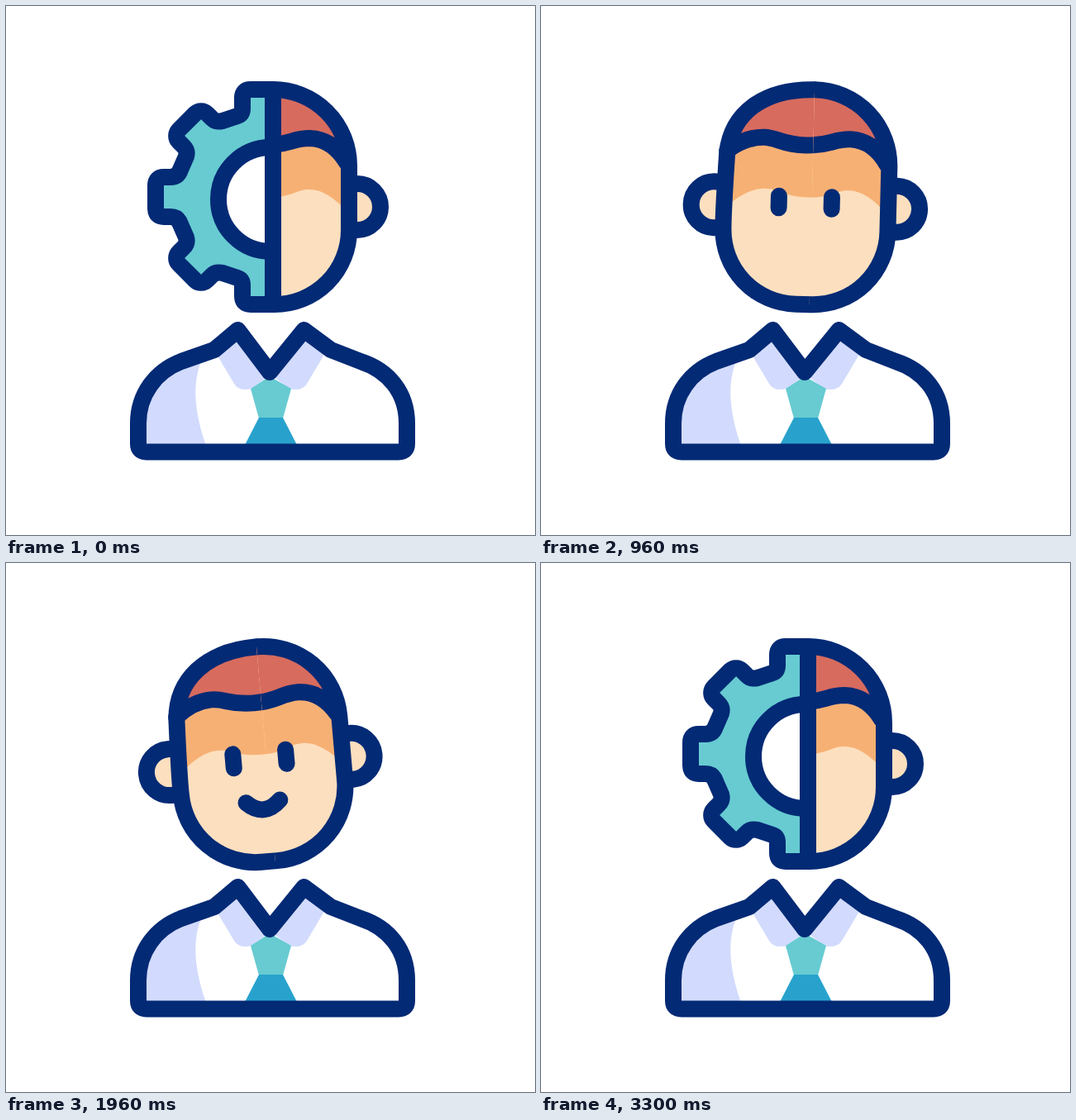
Recreate the animation shown at these times as an HTML page. Size 640 px wide and 640 px high, loop 3560 ms.

```html
<!DOCTYPE html>
<html lang="en">
<head>
<meta charset="utf-8">
<title>Half gear, half head</title>
<style>
  html, body { margin: 0; height: 100%; overflow: hidden; background: #fff; }
  svg { display: block; width: 100vw; height: 100vh; }
  .line { fill: none; stroke: #032a75; stroke-width: 20; stroke-linecap: round; stroke-linejoin: round; }
  .teal { fill: #67cbd1; }
  .skin { fill: #fcdfbe; }
  .cloth { fill: #d2dbfd; }
</style>
</head>
<body>
<svg viewBox="0 0 640 640">
  <defs>
    <clipPath id="gearSide"><path d="M0 0H323V640H0Z"/></clipPath>
    <clipPath id="leftSide"><path d="M0 0H326V640H0Z"/></clipPath>
    <clipPath id="rightSide"><path d="M325 0H640V640H325Z"/></clipPath>
    <path id="skull" d="M325.5 101A92 92 0 0 1 417.5 193V271A90 90 0 0 1 327.5 361H308.5A90 90 0 0 1 218.5 271Q218 250 221 180C225 133 262 101 325.5 101Z"/>
    <clipPath id="inHead"><use href="#skull"/></clipPath>
    <g id="head">
      <use href="#skull" class="skin"/>
      <g clip-path="url(#inHead)">
        <path fill="#f7b074" d="M218 100V248Q245 222 267 222C286 222 290 231.5 320 231.5S352 222 370 222Q392 222 418 252V100Z"/>
        <path fill="#d76b5e" d="M218 90V179Q243 160 265 160C282 160 286 168.5 316 168.5S348 160 370 160Q398 161 414 190V90Z"/>
      </g>
      <path class="line" d="M221 177Q243 160 265 160C282 160 286 168.5 316 168.5S348 160 370 160Q398 161 415 190"/>
      <use href="#skull" class="line"/>
    </g>
    <g id="ear">
      <circle r="28" class="skin"/>
      <circle r="28" class="line"/>
    </g>
    <path id="rim" d="M323 101H296Q286 101 286 111V124Q286 131 280 133L262 139Q254 141 249 136L243 130A10 10 0 0 0 229 130L209 150A10 10 0 0 0 209 164L215 170Q220 175 218 182L211 198Q208 207 199 207H191Q181 207 181 217V231"/>
    <g id="halfGear">
      <path class="teal" d="M323 101H296L286 111V130L255 140L236 127L206 157L219 177L208 207H181V231H323Z"/>
      <use href="#rim" class="teal"/>
      <use href="#rim" class="line"/>
    </g>
  </defs>

  <g id="body">
    <path class="cloth" d="M160 529V500Q165 450 236 430Q220 470 242 532H160Z"/>
    <path class="cloth" d="M254 420L276 457Q281 465 292 464Q298 463 301 460L320 446L339 460Q342 463 348 464Q359 465 364 457L386 420L360 400L319 446L280 400Z"/>
    <path class="teal" d="M319 448L345 463L335 499H306L296 463Z"/>
    <path fill="#28a2cd" d="M306 498H335L352 531H289Z"/>
    <path class="line" d="M319 443L280.5 392L252 416L212 430C181 442 160 470 160 505V529.5Q160 539.5 170 539.5H475Q485 539.5 485 529.5V505C485 468 463 441 429 430L393 416L360.5 392Z"/>
  </g>

  <g clip-path="url(#gearSide)">
    <g id="gear">
      <use href="#halfGear"/>
      <use href="#halfGear" transform="matrix(1 0 0 -1 0 462)"/>
      <path class="line" style="fill:#fff" d="M323 171H320A63 63 0 0 0 320 297H323"/>
      <path class="line" d="M323 101V361"/>
    </g>
  </g>

  <g id="person">
    <g clip-path="url(#leftSide)">
      <g id="leftHalf">
        <use id="leftEar" href="#ear"/>
        <use href="#head"/>
      </g>
    </g>
    <g clip-path="url(#rightSide)">
      <use href="#ear" x="427.5" y="243"/>
      <use href="#head"/>
    </g>
    <path id="divider" class="line" d="M325.5 101V361"/>
    <g id="face" class="line" stroke-width="21">
      <path id="eyes"/>
      <path id="mouth" pathLength="100" d="M296 288Q316.5 308 337 288"/>
    </g>
    <g id="dots" fill="#e6e6ea" stroke="#c3bdb8" stroke-width=".8" stroke-dasharray="1 2">
      <circle cx="285" cy="245" r="10.4"/>
      <circle cx="349" cy="245" r="10.4"/>
      <circle cx="313.5" cy="301" r="10.4"/>
    </g>
  </g>
</svg>
<script>
const LOOP = 3560;
const el = id => document.getElementById(id);
const [gear, person, leftHalf, leftEar, divider, eyes, mouth, dots] =
  ["gear", "person", "leftHalf", "leftEar", "divider", "eyes", "mouth", "dots"].map(el);

const show = (node, on) => node.setAttribute("display", on ? "inline" : "none");
const move = (node, x, y = 0) => node.setAttribute("transform", `translate(${x} ${y})`);

function draw(t) {
  // Smooth 0..1 step between two times
  const step = (from, to) => {
    const p = Math.min(1, Math.max(0, (t - from) / (to - from)));
    return p * p * (3 - 2 * p);
  };

  // The gear hides behind the divider and later returns from the left
  const returning = t >= 3100;
  move(gear, returning ? -86 * (1 - step(3160, 3300)) : 155 * step(120, 380));
  gear.setAttribute("opacity", returning ? step(3100, 3180) : 1);
  show(gear, t < 380 || returning);

  const out = step(330, 590) - step(2660, 2920);
  const earOut = step(440, 640) - step(2660, 2800);
  move(leftHalf, 120 * (1 - out));
  move(leftEar, 207 + 40 * (1 - earOut), 243);
  show(leftHalf, out > 0);
  show(divider, out < 1);

  const shift = -2.5 * (1 - step(600, 760) + step(2660, 2860));
  const tilt = 1.4 * step(660, 940) - 6.4 * step(950, 1340) + 5 * step(1970, 2260);
  person.setAttribute("transform", `translate(${shift} 0) rotate(${tilt} 318 352)`);

  const eye = step(780, 1020) - step(2230, 2420);
  const smile = step(1200, 1440) - step(2230, 2420);
  const top = 245 - 17 * eye;
  eyes.setAttribute("d", `M285 245V${top}M349 245V${top}`);
  mouth.setAttribute("stroke-dasharray", `${100 * smile} 200`);
  mouth.setAttribute("stroke-dashoffset", 50 * smile - 50);
  show(eyes, eye > 0);
  show(mouth, smile > 0);
  show(dots, t >= 2420 && t < 2660);
}

function tick() {
  draw(performance.now() % LOOP);
  requestAnimationFrame(tick);
}
tick();
</script>
</body>
</html>
```
